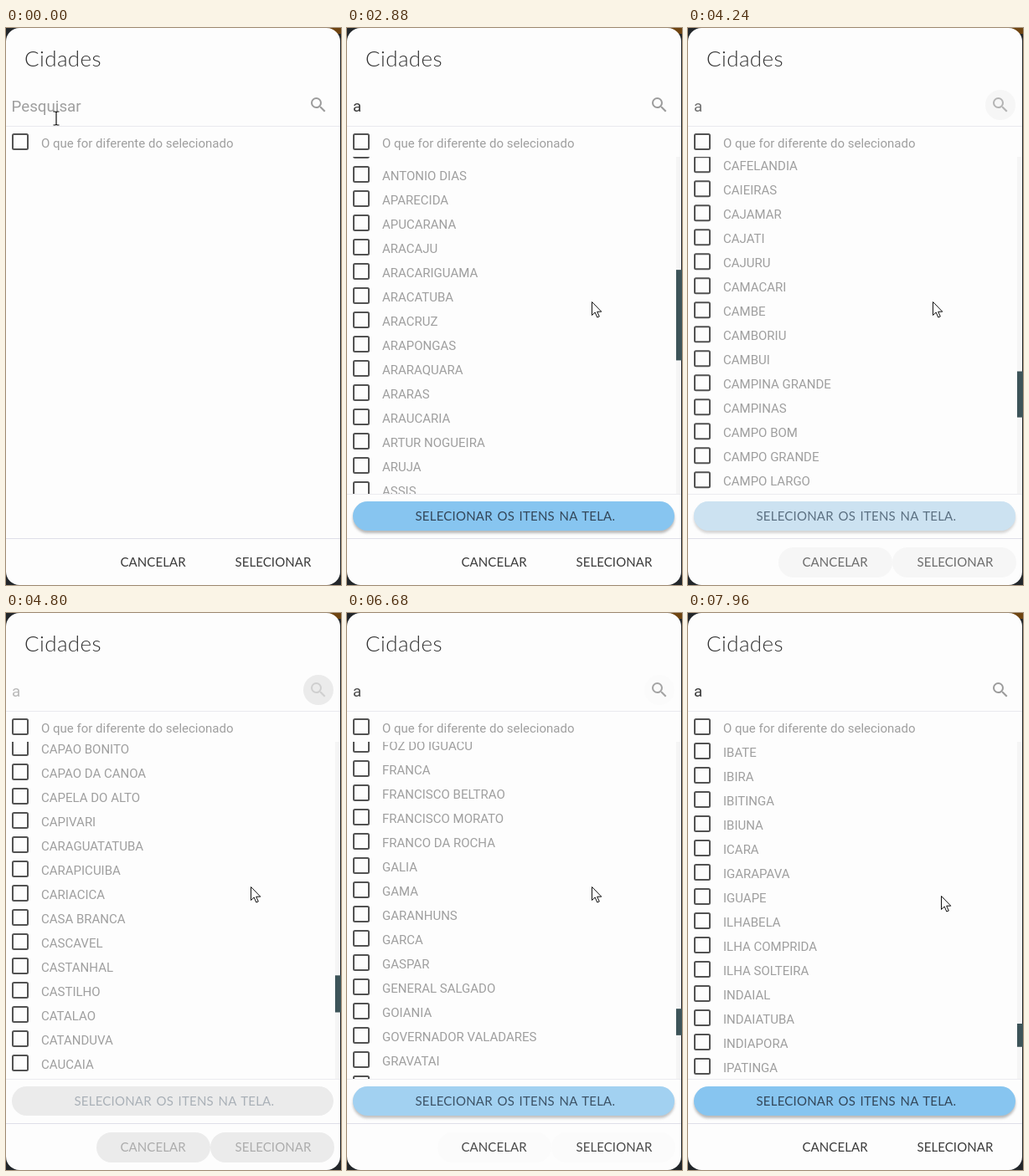
An HTML page that plays this animation: 400x666 px, repeating every 8 s.

```html
<!DOCTYPE html>
<html lang="pt">
<head>
<meta charset="utf-8">
<title>Cidades</title>
<style>
  html, body { margin: 0; width: 100%; height: 100%; overflow: hidden; background: #22262a; }
  svg { display: block; width: 100%; height: 100%; }
  text { font: 15px Roboto, sans-serif; fill: #9f9f9f; }
  .title { font: 300 26px Lato, sans-serif; letter-spacing: .4px; fill: #333; }
  .field { font-size: 18.75px; }
  .btn { font-family: Lato, sans-serif; letter-spacing: .08px; fill: #3c3c3c; }
  .wide { letter-spacing: .22px; word-spacing: 1.5px; fill: #33475a; }
  .pill { fill: #ebebeb; }
  .box { fill: none; stroke: #525252; stroke-width: 2; }
</style>
</head>
<body>
<svg viewBox="0 0 400 666">
  <defs>
    <clipPath id="view"><rect y="154" width="393" height="403"/></clipPath>
    <filter id="blur" x="-5%" y="-40%" width="110%" height="180%"><feGaussianBlur stdDeviation="1.8"/></filter>
  </defs>
  <rect x="385" width="15" height="7" fill="#6e4410"/>
  <rect width="399" height="666" rx="16" fill="#fdfdfd"/>
  <text class="title" x="22" y="46">Cidades</text>

  <text class="field" id="hint" x="6.5" y="100">Pesquisar</text>
  <text class="field dim" id="typed" x="7" y="100" style="fill:#3c3c3c">a</text>
  <path id="caret" d="M8.5 84V104" stroke="#3c3c3c"/>
  <circle class="pill" cx="373" cy="92" r="18"/>
  <path class="dim" transform="translate(361 80)" fill="#9c9c9c" d="M15.5 14h-.79l-.28-.27A6.47 6.47 0 0 0 16 9.5 6.5 6.5 0 1 0 9.5 16c1.61 0 3.09-.59 4.23-1.57l.27.28v.79l5 4.99L20.49 19l-4.99-5zm-6 0a4.5 4.5 0 1 1 0-9 4.5 4.5 0 0 1 0 9z"/>
  <path d="M0 117.5H399" stroke="#e9e9ef"/>
  <rect class="box" x="8" y="127" width="18" height="18" rx="1.5"/>
  <text x="42" y="143">O que for diferente do selecionado</text>

  <g id="results">
    <g clip-path="url(#view)"><g id="list"></g></g>
    <rect x="393" y="154" width="6" height="403" fill="#f5f5f5"/>
    <rect id="thumb" x="393" width="7" fill="#3d5459"/>
    <path d="M0 557.5H399" stroke="#ececf0"/>
    <g id="live">
      <rect x="7" y="569" width="384" height="35" rx="17.5" fill="#a8a8a8" opacity=".8" filter="url(#blur)"/>
      <rect x="7" y="566" width="384" height="35" rx="17.5" fill="#87c5f0"/>
    </g>
    <rect class="pill" x="7" y="566" width="384" height="35" rx="17.5"/>
    <text class="btn wide dim" x="81.5" y="589">SELECIONAR OS ITENS NA TELA.</text>
  </g>

  <path d="M0 610.5H399" stroke="#dfdfe8"/>
  <rect class="pill" x="108" y="621" width="136" height="36" rx="18"/>
  <rect class="pill" x="244" y="621" width="148" height="36" rx="18"/>
  <text class="btn dim" x="136.5" y="644">CANCELAR</text>
  <text class="btn dim" x="273.5" y="644">SELECIONAR</text>

  <path id="beam" fill="none" stroke="#111" stroke-width="1.2" d="M-3.5-8H-1L0-7 1-8H3.5M0-7V7M-3.5 8H-1L0 7 1 8H3.5"/>
  <path id="arrow" fill="#fff" stroke="#111" stroke-linejoin="round" d="M.5.5V16.5L4.2 13 6.8 19 9.3 18 6.7 12.2H11.8Z"/>
</svg>
<script>
const names = `ABADIA,ADAMANTINA,AGUAI,AGUAS CLARAS,AGUDOS,ALFENAS,ALMIRANTE TAMANDARE,ALUMINIO,ALVORADA,AMERICANA,AMPARO,ANANINDEUA,ANAPOLIS,ANDRADINA,ANGATUBA,ANGRA DOS REIS,ANHEMBI,ANTONIO DIAS,APARECIDA,APUCARANA,ARACAJU,ARACARIGUAMA,ARACATUBA,ARACRUZ,ARAPONGAS,ARARAQUARA,ARARAS,ARAUCARIA,ARTUR NOGUEIRA,ARUJA,ASSIS,ATIBAIA,AURIFLAMA,AVANHANDAVA,AVARE,BADY BASSITT,BALNEARIO CAMBORIU,BALSAMO,BARBACENA,BARIRI,BARRA BONITA,BARRETOS,BARUERI,BASTOS,BATATAIS,BAURU,BENTO GONCALVES,BERNARDINO DE CAMPOS,BERTIOGA,BIGUACU,BIRITIBA MIRIM,BLUMENAU,BOCAINA,BOITUVA,BOTUCATU,BRAGANCA PAULISTA,BRASILIA,BRAZLANDIA,BURITAMA,CABREUVA,CACADOR,CACAPAVA,CACHOEIRINHA,CACONDE,CAFELANDIA,CAIEIRAS,CAJAMAR,CAJATI,CAJURU,CAMACARI,CAMBE,CAMBORIU,CAMBUI,CAMPINA GRANDE,CAMPINAS,CAMPO BOM,CAMPO GRANDE,CAMPO LARGO,CAMPO LIMPO PAULISTA,CAMPO MOURAO,CAMPOS DO JORDAO,CANDIDO MOTA,CANELA,CANOAS,CANOINHAS,CANTAGALO,CAPANEMA,CAPAO BONITO,CAPAO DA CANOA,CAPELA DO ALTO,CAPIVARI,CARAGUATATUBA,CARAPICUIBA,CARIACICA,CASA BRANCA,CASCAVEL,CASTANHAL,CASTILHO,CATALAO,CATANDUVA,CAUCAIA,CAXIAS DO SUL,CEILANDIA,CERQUILHO,CHAPECO,COLINA,COLOMBO,CONCHAL,CONTAGEM,CORDEIROPOLIS,COSMOPOLIS,COTIA,CRAVINHOS,CRICIUMA,CRUZEIRO,CUBATAO,CUIABA,CURITIBA,DESCALVADO,DIADEMA,DIAMANTINA,DIAS DAVILA,DIVINOLANDIA,DOURADO,DOURADOS,DUQUE DE CAXIAS,ECHAPORA,ELDORADO,EMBU DAS ARTES,EMBU GUACU,ESPIRITO SANTO DO PINHAL,EUCLIDES DA CUNHA PAULISTA,FAZENDA RIO GRANDE,FEIRA DE SANTANA,FERNANDOPOLIS,FERRAZ DE VASCONCELOS,FLORES DA CUNHA,FLORIANOPOLIS,FORTALEZA,FOZ DO IGUACU,FRANCA,FRANCISCO BELTRAO,FRANCISCO MORATO,FRANCO DA ROCHA,GALIA,GAMA,GARANHUNS,GARCA,GASPAR,GENERAL SALGADO,GOIANIA,GOVERNADOR VALADARES,GRAVATAI,GUAICARA,GUAIRA,GUAPIACU,GUARA,GUARAPUAVA,GUARARAPES,GUARATINGUETA,GUARUJA,GUARULHOS,GUAXUPE,HERCULANDIA,HORTOLANDIA,IACANGA,IACRI,IBAITI,IBATE,IBIRA,IBITINGA,IBIUNA,ICARA,IGARAPAVA,IGUAPE,ILHABELA,ILHA COMPRIDA,ILHA SOLTEIRA,INDAIAL,INDAIATUBA,INDIAPORA,IPATINGA,IPAUSSU,IPERO`.split(',');

const LOOP = 8000, STEP = 40, ROW = 29, PAGE = 25, TOP = 154, VIEW = 403;
const WAIT = 320, FADE = 400, REST = 60;

// Reaching the end of the list requests a page, which arrives after WAIT.
const requests = [880, 1720, 3000, 3840, 4480, 5000, 6200, 7240];
const bottom = pages => pages ? ROW * PAGE * pages + 32 - VIEW : 0;

// Pauses on the way down: from, to, position.
const pauses = [[2100, 2560, 354], [2680, 2880, 485], [3720, 3720, 1304], [5680, 5680, 3551],
                [5840, 6040, 3800], [6680, 6680, 4041], [6920, 7200, 4645], [7960, LOOP, 4874]];
const stops = [...requests.map((t, i) => [t, t + WAIT + REST, bottom(i)]), ...pauses]
  .sort((a, b) => a[0] - b[0]);

const $ = id => document.getElementById(id);
const all = selector => document.querySelectorAll(selector);
const show = (el, on) => { el.style.display = on ? '' : 'none'; };
const clamp = x => Math.min(1, Math.max(0, x));
const easeOut = x => 1 - (1 - clamp(x)) ** 4;
const smooth = x => (x = clamp(x)) * x * (3 - 2 * x);

function scrollAt(t) {
  let pos = 0, left = 0;
  for (const [from, to, next] of stops) {
    if (t < from) return pos + (next - pos) * clamp((t - left) / (from - left));
    pos = next;
    left = to;
  }
  return pos;
}

function mouseAt(t) {
  const click = smooth((t - 40) / 600), leave = smooth((t - 920) / 640), drift = smooth((t - 7640) / 280);
  return [60 - 2 * click + 234 * leave + 10 * drift,
          108 - 16 * click - 18 * Math.sin(Math.PI * click) + 235 * leave + 11 * drift];
}

$('list').innerHTML = names.map((name, i) => `<g transform="translate(0 ${TOP + i * ROW})">
  <rect class="box" x="8" y="4" width="18" height="18" rx="1.5"/><text x="42" y="20">${name}</text></g>`).join('');
const rows = [...$('list').children], pills = all('.pill'), dims = all('.dim');

function draw(t) {
  const pos = scrollAt(t);
  const count = PAGE * requests.filter(r => t >= r + WAIT).length;
  const lock = clamp(requests.reduce((sum, r) =>
    sum + easeOut((t - r) / FADE) - easeOut((t - r - WAIT) / FADE), 0));

  show($('hint'), t < 720);
  show($('typed'), t >= 720);
  show($('caret'), t >= 320 && t < 880);
  $('caret').setAttribute('transform', `translate(${t < 720 ? 0 : 10} 0)`);

  show($('results'), count > 0);
  $('list').setAttribute('transform', `translate(0 ${-pos})`);
  rows.forEach((row, i) => {
    const y = i * ROW - pos;
    show(row, i < count && y > -ROW && y < VIEW);
  });
  const ratio = VIEW / (ROW * count + 50);
  $('thumb').setAttribute('y', TOP + (pos && pos + 18) * ratio);
  $('thumb').setAttribute('height', VIEW * ratio);

  $('live').style.opacity = 1 - lock;
  pills.forEach(el => { el.style.opacity = lock; });
  dims.forEach(el => { el.style.opacity = 1 - .65 * lock; });

  const [x, y] = mouseAt(t), overField = y < 112;
  show($('beam'), overField);
  show($('arrow'), !overField);
  for (const id of ['beam', 'arrow']) $(id).setAttribute('transform', `translate(${x} ${y})`);
}

const start = performance.now();
function tick(now) {
  const t = Math.max(0, now - start) + 6;
  draw(Math.floor(t / STEP) * STEP % LOOP);
  requestAnimationFrame(tick);
}
draw(0);
requestAnimationFrame(tick);
</script>
</body>
</html>
```
